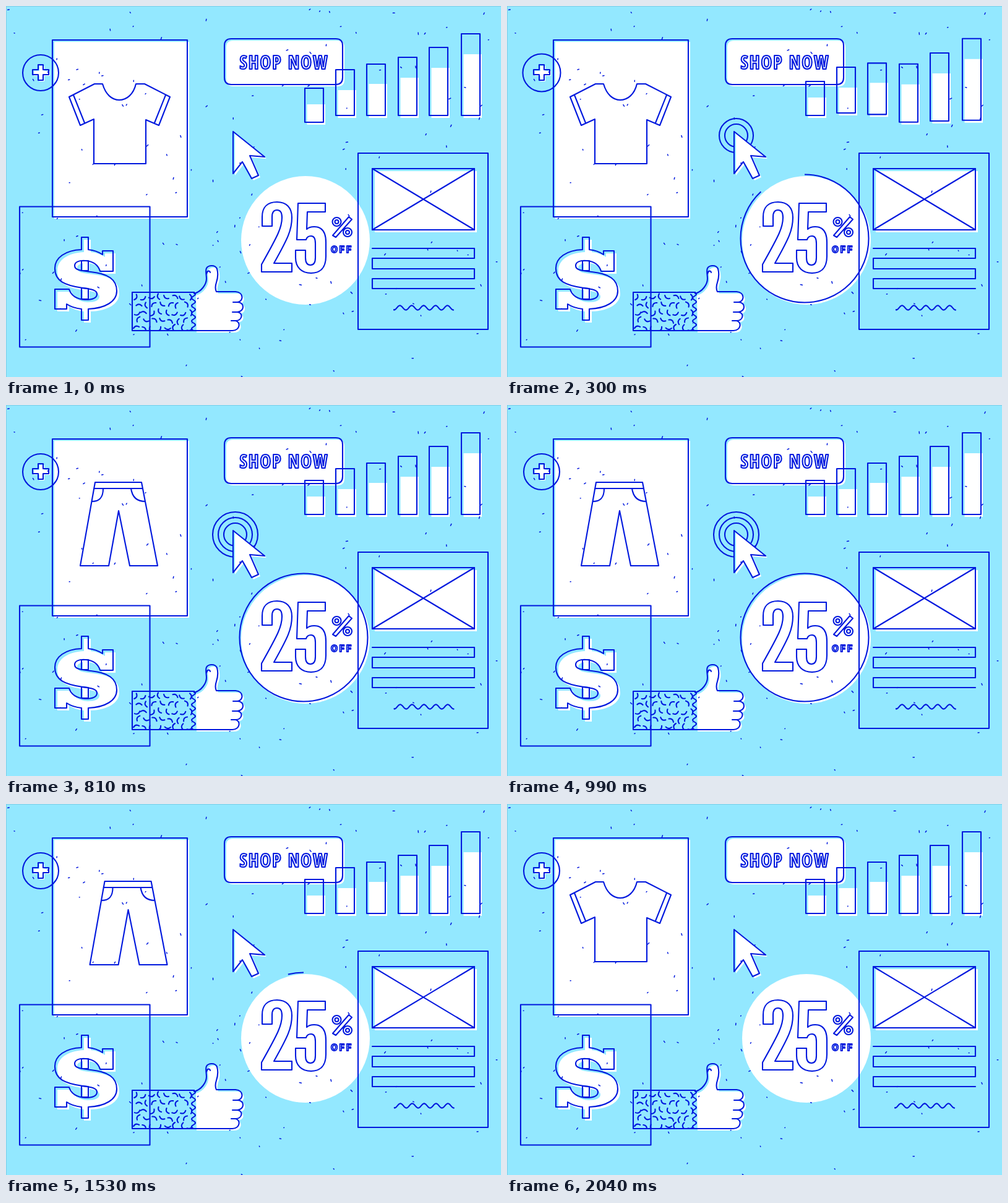
An HTML page that plays this animation: 800 px wide and 600 px high, repeating every 2.07 s.

```html
<!DOCTYPE html>
<html lang="en">
<head>
<meta charset="utf-8">
<title>Shop icons</title>
<style>
  html, body { margin: 0; width: 100%; height: 100%; overflow: hidden; background: #93e8ff; }
  svg { display: block; width: 800px; height: 600px; }
  .line { fill: none; stroke: #0018de; stroke-width: 2.1; stroke-linejoin: round; stroke-linecap: round; }
  .white { fill: #fff; stroke: none; }
  .bold { stroke-width: 2.6; }
  #label { font: 700 32px "Open Sans Condensed", "Open Sans", "Roboto Condensed", "Noto Sans", sans-serif; font-stretch: 75%; letter-spacing: 2px; }
  #off { font: 800 14px Inter, "Liberation Sans", sans-serif; letter-spacing: 3px; }
</style>
</head>
<body>
<svg viewBox="0 0 800 600">
  <defs>
    <clipPath id="window"><rect x="85" y="100" width="201" height="200"/></clipPath>
    <clipPath id="cloth"><rect x="205" y="464" width="96" height="61"/></clipPath>
  </defs>
  <rect width="800" height="600" fill="#93e8ff"/>
  <path d="M.5 600V.5H800" fill="none" stroke="#7fcde8"/>
  <g id="whites" class="white"></g>
  <g id="bars"></g>
  <g id="lines" class="line"></g>

  <g clip-path="url(#window)" class="line">
    <path id="shirt" d="M143 126H156C161 143 171 152 183 152S206 143 210 126H224L265 147 247 193 226 184V255H142V183L120 193 102 147ZM109 144 127 189M258 144 240 189"/>
    <path id="pants" d="M144 125H219L245 260H200L182 171 166 260H120ZM142 135H221M157 135C157 149 152 156 139 156M202 135C204 149 211 156 225 156"/>
  </g>

  <g class="line">
    <circle id="plusRing" cx="56" cy="108"/>
    <path id="discRing" d="M481 272.5A103.5 103.5 0 0 1 481 479.5A103.5 103.5 0 0 1 481 272.5" pathLength="1" stroke-linecap="butt" style="stroke-linecap:butt"/>
    <g id="rings"></g>
    <g id="cursor"></g>
    <path id="wave"/>
    <text id="label" x="449.5" y="102" text-anchor="middle">SHOP NOW</text>
    <text id="off" x="525" y="399" stroke-width="1.8">OFF</text>
    <g clip-path="url(#cloth)"><path id="weave"/></g>
    <path id="cuff"/>
  </g>
  <path id="specks" class="line" style="stroke-width:1.5"/>
</svg>
<script>
const LOOP = 2070, STEP = 30;
const $ = id => document.getElementById(id);
const add = (parent, tag, attrs) => {
  const node = document.createElementNS('http://www.w3.org/2000/svg', tag);
  for (const key in attrs) node.setAttribute(key, attrs[key]);
  return parent.appendChild(node);
};
const box = (x, y, x2, y2) => `M${x} ${y}H${x2}V${y2}H${x}Z`;
const round = (x, y, r) => `M${x - r} ${y}a${r} ${r} 0 1 1 ${2 * r} 0a${r} ${r} 0 1 1 ${-2 * r} 0Z`;
const line = d => add($('lines'), 'path', { d });
// An outline with its white print slightly out of register.
const printed = (d, dx = 3, dy = 3) => {
  add($('whites'), 'path', { d, transform: `translate(${dx} ${dy})` });
  return line(d);
};
let seed = 11;
const random = () => (seed = (seed * 16807) % 2147483647) / 2147483647;

const clamp = p => Math.max(0, Math.min(1, p));
const progress = (t, from, to) => clamp((t - from) / (to - from));
const smooth = p => p * p * (3 - 2 * p);
const cubic = p => p < .5 ? 4 * p ** 3 : 1 - 4 * (1 - p) ** 3;

// Cards, button and badge
printed(box(75, 55, 293, 341));
printed('M364 53H533Q544 53 544 64V116Q544 127 533 127H364Q353 127 353 116V64Q353 53 364 53Z');
printed('M52 95H60V103H69V111H60V120H52V111H43V103H52Z', 2, 2);
add($('whites'), 'circle', { cx: 484, cy: 379, r: 104 });
line(box(22, 324.5, 232.5, 551.5));

// Dollar
printed('M122 374H133V394C143 395 150 398 156 402V396H173V429H152C149 419 141 413 129 412C118 411 111 414 111 420C111 427 120 428 137 430C165 433 179 442 179 461C179 478 160 489 133 490V508H122V490C112 489 104 486 98 482V490H79V458H102C105 468 113 474 128 475C140 475 147 472 147 466C147 460 140 458 124 456C95 452 79 445 79 424C79 407 96 395 122 394Z', 4, 4);
printed('M122 412V428H133V412ZM122 456V474H133V457Z', 2, 0);

// Discount
line('M414 356V341C414 325 423 317 438 317S462 326 462 342C462 362 456 375 433 416H462V430H413V418C440 370 446 358 446 342C446 334 443 330 438 330S430 334 430 341V356Z');
line('M472 319H516V333H487L486 361C489 358 493 357 498 357C511 357 517 366 517 382V405C517 423 508 432 493 432S468 423 468 407V395H484V407C484 415 487 419 492 419S500 415 500 407V384C500 376 498 372 493 372S486 374 485 378H470Z');
line('M554 341 559 345 533 374 528 371Z' + [[534.5, 349], [552, 366]].map(([x, y]) => round(x, y, 7) + round(x, y, 3)).join(''));

// Page
line(box(569, 238, 779, 523));
printed(box(592, 263, 757, 362), 4, 4);
line('M592 263 757 362M757 263 592 362');
line('M592 392H757V408H592V425H757V441H592V457H757');
let wave = 'M627 491';
for (let x = 627; x <= 723; x++) wave += `L${x} ${(488 + 3.6 * Math.cos((x - 627) / 19.2 * 2 * Math.PI)).toFixed(1)}`;
$('wave').setAttribute('d', wave);

// Hand and sleeve
printed('M304 465C316 462 324 450 324 441C324 435 322 428 324 424C327 419 338 418 341 425C343 432 343 438 340 447C338 453 338 458 340 462H371C385 463 384 478 374 479C386 479 386 494 374 495C384 496 382 509 371 509C380 511 378 525 366 525H305').removeAttribute('transform');
line('M374 479H367M374 495H366M371 509H364M324 433C325 428 329 427 330 431');
line('M304 463H204V525H306');
let cuff = 'M304 463';
for (let y = 463; y <= 525; y++) cuff += `L${(303 + 3 * Math.sin((y - 463) / 12.4 * 2 * Math.PI)).toFixed(1)} ${y}`;
$('cuff').setAttribute('d', cuff);
let weave = '';
for (let row = 0; row < 5; row++) {
  for (let col = 0; col < 8; col++) {
    const x = 209 + col * 12.4 + row % 2 * 5 + random() * 3, y = 469 + row * 12.5 + random() * 4;
    const a = random() * 2 * Math.PI, dx = 4.6 * Math.cos(a), dy = 4.6 * Math.sin(a);
    weave += `M${x - dx} ${y - dy}Q${x + dy} ${y - dx} ${x + dx} ${y + dy}`;
  }
}
$('weave').setAttribute('d', weave);

// Pointer
const pointer = 'M367 203 418 244 394 242 408 274 397 279 382 252 367 271Z';
add($('cursor'), 'path', { d: pointer, style: 'fill:#93e8ff;stroke:none' });
add($('cursor'), 'path', { d: pointer, style: 'fill:#fff;stroke:none', transform: 'translate(3 3)' });
add($('cursor'), 'path', { d: pointer });
const rings = [[18.5, 150, 1140], [27.5, 240, 1200], [36.5, 330, 1260]].map(([r, on, off]) =>
  ({ on, off, node: add($('rings'), 'circle', { cx: 370.5, cy: 209.5, r }) }));

// Chart: left, top, fill level, moment of the dip, pause in the dip
const bars = [
  [483, 122, 148, 0, 0], [533, 103, 136, 120, 0], [583, 94, 126, 165, 0],
  [634, 83, 116, 310, 0], [684, 67, 100, 330, 0], [736, 45, 78, 340, 130]
].map(([x, top, level, dip, pause]) => {
  const node = add($('bars'), 'g', {});
  add(node, 'path', { class: 'white', d: box(x + 3.5, level, x + 33, 181) });
  add(node, 'path', { class: 'line', d: box(x, top, x + 30, 177) });
  return { node, dip, pause };
});
const bounce = (t, dip, pause) => {
  const up = dip + pause;
  return 11 * smooth(progress(t, dip - 110, dip))
    - 15 * smooth(progress(t, up, up + 180))
    + 4 * smooth(progress(t, up + 180, up + 290));
};

// Grain
let specks = '';
for (let i = 0; i < 135; i++) {
  const a = random() * Math.PI, size = .6 + random() * 2.6;
  specks += `M${random() * 800} ${random() * 600}l${size * Math.cos(a)} ${size * Math.sin(a)}`;
}
$('specks').setAttribute('d', specks);

// Keep the label inside its button whichever condensed face is present.
const label = $('label'), wide = label.getComputedTextLength();
if (wide > 143) label.style.fontSize = 32 * 143 / wide + 'px';

const slide = (id, x) => $(id).setAttribute('transform', `translate(${x.toFixed(2)} 0)`);

function draw(t) {
  const swap = cubic(progress(t, 300, 576)) - cubic(progress(t, 1457, 1733));
  slide('shirt', -210 * swap);
  slide('pants', 210 * (1 - swap));
  slide('wave', 1 - Math.cos(t / 690 * 2 * Math.PI));

  $('plusRing').setAttribute('r', 29 + 2 * Math.sin(Math.PI * progress(t, 60, 390)));

  const start = cubic(progress(t, 1188, 1623)), end = cubic(progress(t, 0, 435));
  const disc = $('discRing');
  disc.style.display = end - start > .001 ? '' : 'none';
  disc.setAttribute('stroke-dasharray', `${end - start} 2`);
  disc.setAttribute('stroke-dashoffset', -start);

  for (const { node, on, off } of rings) node.style.display = t >= on && t < off ? '' : 'none';
  for (const { node, dip, pause } of bars) node.setAttribute('transform', `translate(0 ${bounce(t, dip, pause).toFixed(2)})`);
}

const origin = performance.now();
function frame() {
  const t = (performance.now() - origin) % LOOP;
  draw(Math.floor(t / STEP) * STEP);
  requestAnimationFrame(frame);
}
frame();
</script>
</body>
</html>
```
